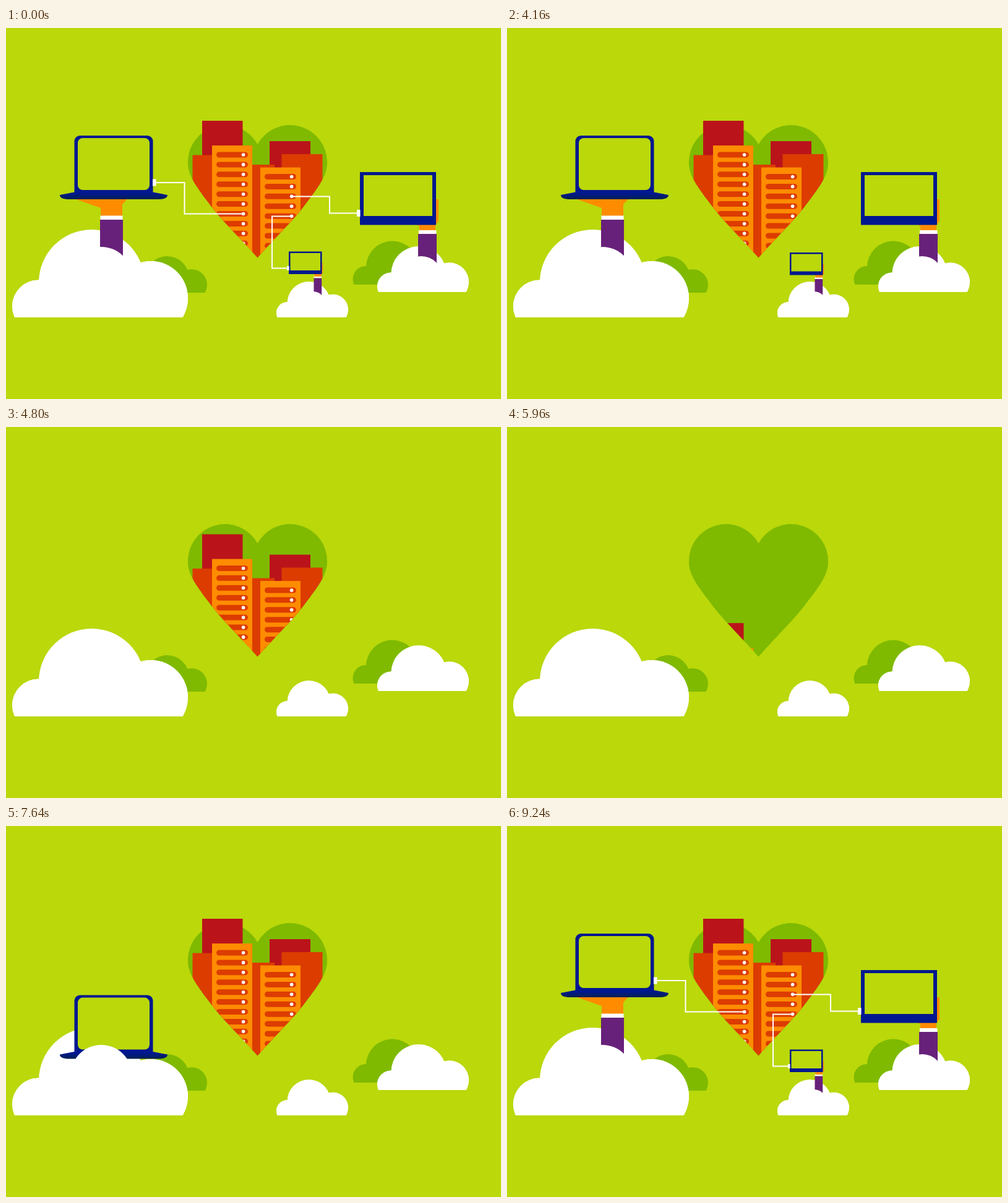
Write an HTML page that moves like this. It is 800 px wide and 600 px high and loops after 9.28 s.

```html
<!DOCTYPE html>
<html lang="en">
<head>
<meta charset="utf-8">
<title>Connected devices</title>
<style>
  html, body { margin: 0; width: 100%; height: 100%; overflow: hidden; background: #bad80a; }
  svg { display: block; width: 800px; height: 600px; }
  text { font: 18px "Liberation Mono", monospace; fill: #fff; white-space: pre; }
  #phone text { font-size: 14.5px; }
  .wire path { fill: none; stroke: #fff; stroke-width: 2; stroke-dasharray: 1 2; }
  .white, .wire rect { fill: #fff; }
  .green { fill: #7fba00; }
  .navy { fill: #00188f; }
  .screen { fill: #bad80a; }
  .hand { fill: #ff8c00; }
  .arm { fill: #68217a; }
  .rust { fill: #dc3c00; }
  .red { fill: #ba141a; }
</style>
</head>
<body>
<svg viewBox="0 0 800 600">
  <defs>
    <clipPath id="flat"><rect x="-5" y="-150" width="300" height="150"/></clipPath>
    <clipPath id="skyline">
      <path d="M294 0V219C294 243 317 268 333 290C350 312 372 333 406.5 371.5C441 333 463 312 480 290C496 268 519 243 519 219V0Z"/>
    </clipPath>
    <clipPath id="laptopArea"><rect width="800" height="468"/></clipPath>
    <clipPath id="monitorArea"><rect width="800" height="427"/></clipPath>
    <clipPath id="phoneArea"><rect width="800" height="468"/></clipPath>
    <linearGradient id="shade" x2="0" y2="1">
      <stop offset=".2" stop-color="#00188f"/><stop offset="1" stop-color="#002050"/>
    </linearGradient>
    <g id="puffs" clip-path="url(#flat)">
      <circle cx="42.5" cy="-18" r="42.5"/>
      <circle cx="224" cy="-31" r="60"/>
      <rect x="42.5" y="-58" width="181.5" height="58"/>
    </g>
    <g id="cloud">
      <use href="#puffs"/>
      <circle cx="128.5" cy="-56.5" r="85.5" clip-path="url(#flat)"/>
    </g>
  </defs>

  <use href="#cloud" class="green" transform="translate(207 428) scale(.4155)"/>
  <use href="#cloud" class="green" transform="translate(560.5 415) scale(.496)"/>
  <use href="#cloud" class="white" transform="translate(10 468)"/>
  <use href="#cloud" class="white" transform="translate(600 427) scale(.521)"/>
  <use href="#cloud" class="white" transform="translate(437 468) scale(.408)"/>

  <path class="green" d="M406.5 371.5C372 333 350 312 333 290C317 268 294 243 294 219A60 60 0 0 1 406.5 188A60 60 0 0 1 519 219C519 243 496 268 480 290C463 312 441 333 406.5 371.5Z"/>
  <g id="buildings" clip-path="url(#skyline)"></g>

  <g clip-path="url(#laptopArea)">
    <g id="laptop">
      <path class="hand" d="M113 277H196L188 285V305H153V291Z"/>
      <rect class="white" x="152.5" y="303.5" width="36" height="7"/>
      <rect class="arm" x="152" y="310" width="37" height="100"/>
      <path class="navy" d="M110.5 268V183a9 9 0 0 1 9-9h109a9 9 0 0 1 9 9v85Z"/>
      <rect class="screen" x="116" y="178" width="116" height="84" rx="8"/>
      <path fill="url(#shade)" d="M87 270L110.5 265.5H237.5L261 270Q261 277 246 277H102Q87 277 87 270Z"/>
      <text></text>
    </g>
    <circle class="white" cx="154" cy="404" r="50"/>
    <use href="#puffs" class="white" transform="translate(10 468)"/>
  </g>

  <g clip-path="url(#monitorArea)">
    <g id="monitor">
      <path class="hand" d="M663 317L668 321V329H694V319L699 312V277H690V317Z"/>
      <rect class="white" x="667" y="327" width="28.5" height="7"/>
      <rect class="arm" x="666" y="333" width="30" height="80"/>
      <rect class="navy" x="572" y="233" width="123" height="85.5"/>
      <rect class="screen" x="578" y="238" width="111" height="66"/>
      <text></text>
    </g>
    <circle class="white" cx="671" cy="403" r="34"/>
    <use href="#puffs" class="white" transform="translate(600 427) scale(.521)"/>
  </g>

  <g clip-path="url(#phoneArea)">
    <g id="phone">
      <path class="hand" d="M496.500 397.500L498.500 399V403H510V399L512 396V380H508V397.500Z"/>
      <rect class="white" x="497.500" y="402" width="12.500" height="2.500"/>
      <rect class="arm" x="497.500" y="404.500" width="12.700" height="40"/>
      <rect class="navy" x="457" y="361.500" width="53.500" height="36.500"/>
      <rect class="screen" x="459.500" y="364" width="48.500" height="28"/>
      <text></text>
    </g>
    <circle class="white" cx="496" cy="446" r="20"/>
    <use href="#puffs" class="white" transform="translate(437 468) scale(.408)"/>
  </g>

  <g class="wire"><path pathLength="1" d="M384 300.500H288.500V250H240"/><rect x="237" y="244.500" width="5.500" height="11"/></g>
  <g class="wire"><path pathLength="1" d="M462 272.500H523V299.500H570"/><rect x="567" y="294" width="5.500" height="11"/></g>
  <g class="wire"><path pathLength="1" d="M462 304.500H430V388.500H456"/><rect x="454" y="385" width="3.500" height="7"/></g>
</svg>
<script>
  const LOOP = 9280, SINK = 230, NS = "http://www.w3.org/2000/svg";
  const $ = id => document.getElementById(id);
  const add = (parent, tag, attrs) => {
    const el = document.createElementNS(NS, tag);
    for (const key in attrs) el.setAttribute(key, attrs[key]);
    return parent.appendChild(el);
  };

  const part = (t, start, length) => Math.min(1, Math.max(0, (t - start) / length));
  const backIn = (p, s) => p * p * ((s + 1) * p - s);
  const backOut = (p, s) => 1 - backIn(1 - p, s);
  const inOut = p => p < .5 ? 4 * p ** 3 : 1 - 4 * (1 - p) ** 3;

  // x, top, width, height, colour class, rise delay, server rack?
  const buildings = [
    [317, 150, 65.5, 300, "red", 0],
    [301.5, 205.5, 64, 300, "rust", 82],
    [426, 183, 66, 300, "red", 104],
    [397, 221, 37, 300, "rust", 0],
    [445.5, 204, 66, 300, "rust", 220],
    [333, 190, 65, 176, "hand", 0, true],
    [411, 225.5, 65, 300, "hand", 155, true]
  ].map(([x, y, width, height, colour, delay, rack]) => {
    const el = add($("buildings"), "g", {});
    add(el, "rect", { x, y, width, height, class: colour });
    for (let i = 0; rack && i < 10; i++) {
      const cy = y + 15 + i * 15.92;
      add(el, "rect", { x: x + 7, y: cy - 4.5, width: 51, height: 9, rx: 4.5, class: "rust" });
      add(el, "circle", { cx: x + 50.6, cy, r: 2.8, class: "white" });
    }
    return { el, delay };
  });

  const devices = [
    { id: "laptop", x: 125.5, y: 207.5, lines: ["101010101", "001010101", "10101010"],
      dx: 0, dy: 220, fall: 4240, fallTime: 440, rise: 7228 },
    { id: "monitor", x: 584.5, y: 260.5, lines: ["100101011", "101001001", "101010101"],
      dx: 35, dy: 175, fall: 4180, fallTime: 400, rise: 7500 },
    { id: "phone", x: 466.5, y: 383, lines: ["1010"],
      dx: 0, dy: 95, fall: 4120, fallTime: 320, rise: 7760 }
  ];
  for (const d of devices) {
    d.el = $(d.id);
    d.rows = d.lines.map((_, i) =>
      add(d.el.querySelector("text"), "tspan", { x: d.x, y: d.y + i * 18.7 }));
    d.size = d.lines.join("").length;
  }
  const wires = [...document.querySelectorAll(".wire")];

  function draw(t) {
    for (const { el, delay } of buildings) {
      const y = t < 5600
        ? SINK * backIn(part(t, 4307, 812), .85)
        : SINK * (1 - backOut(part(t, 5880 + delay, 1130), 1.19));
      el.setAttribute("transform", `translate(0 ${y})`);
    }

    const typed = t < 2000 ? part(t, 0, 1520) : 1 - part(t, 2320, 1400);
    for (const d of devices) {
      const down = t < 5600
        ? part(t, d.fall, d.fallTime) ** 2
        : 1 - inOut(part(t, d.rise, 800));
      d.el.setAttribute("transform", `translate(${d.dx * down} ${d.dy * down})`);
      let left = Math.round(typed * d.size);
      d.rows.forEach((row, i) => {
        row.textContent = d.lines[i].slice(0, Math.max(0, left));
        left -= d.lines[i].length;
      });
    }

    const reach = t < 5600 ? 1 - part(t, 2760, 900) : part(t, 8280, 480);
    for (const wire of wires) {
      wire.firstChild.style.strokeDashoffset = 1 - reach;
      wire.lastChild.style.opacity = reach > .96 ? 1 : 0;
    }
  }

  const begin = performance.now();
  (function tick() {
    draw((performance.now() - begin) % LOOP);
    requestAnimationFrame(tick);
  })();
</script>
</body>
</html>
```
